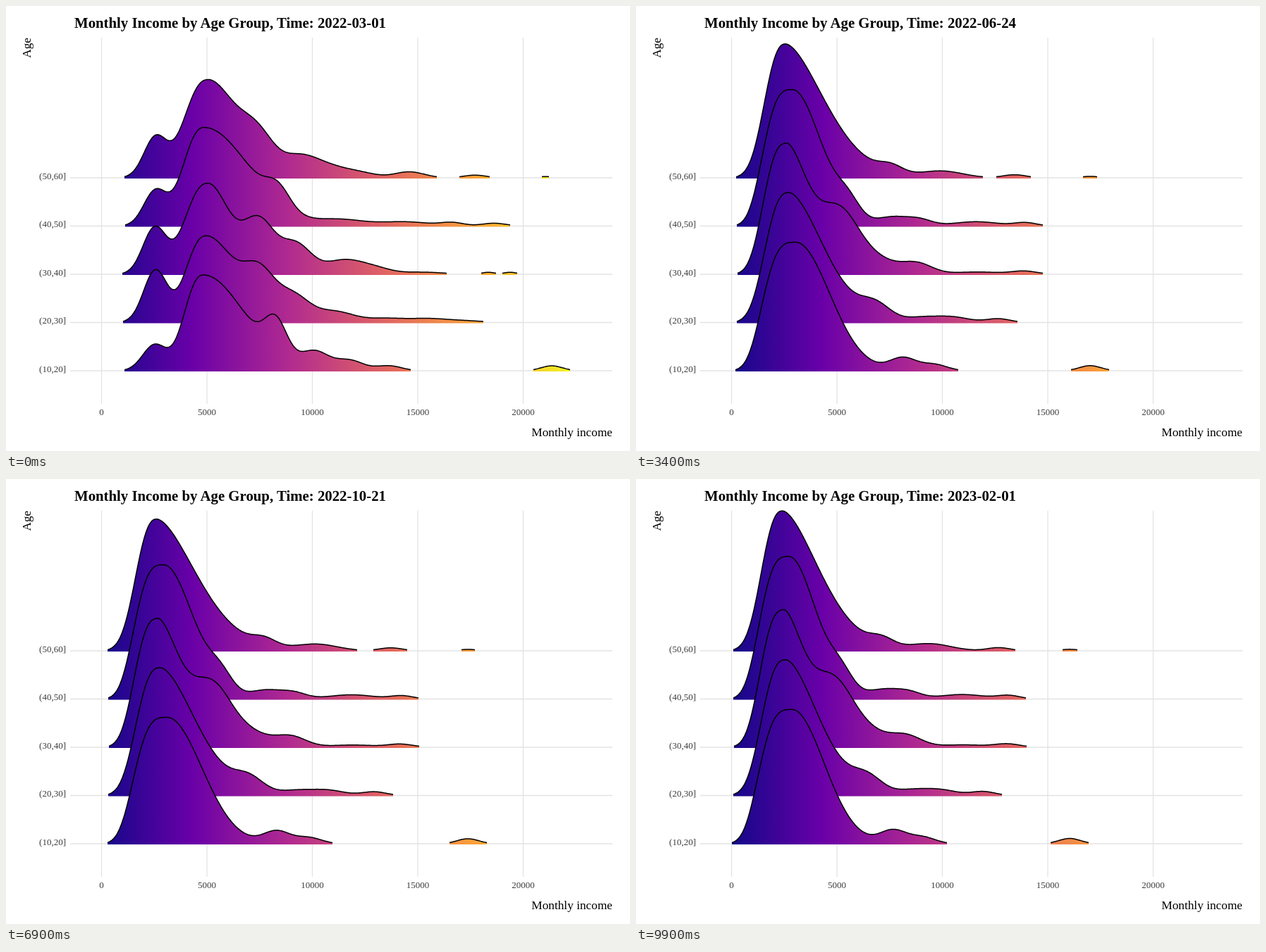
An HTML page that plays this animation: 885 px wide and 632 px high, repeating every 10000 ms.

```html
<!DOCTYPE html>
<html lang="en">
<head>
<meta charset="utf-8">
<title>Monthly Income by Age Group</title>
<style>
  html, body { margin: 0; width: 100%; height: 100%; overflow: hidden; background: #fff; }
  svg { display: block; width: 885px; height: 632px; font-family: "Liberation Serif", "Times New Roman", serif; }
  #title { font-size: 20.8px; font-weight: bold; }
  .axis { font-size: 17.3px; text-anchor: end; }
  .tick { font-size: 13px; fill: #3c3c3c; }
  .grid { stroke: #e3e3e3; stroke-width: 1.3; }
  .line { fill: none; stroke: #000; stroke-width: 1.5; stroke-linejoin: round; }
</style>
</head>
<body>
<svg id="stage" viewBox="0 0 885 632">
  <defs><linearGradient id="plasma" gradientUnits="userSpaceOnUse" x1="128" x2="812" y1="0" y2="0"></linearGradient></defs>
  <text id="title" x="97" y="30.5"></text>
  <text class="axis" x="860" y="611">Monthly income</text>
  <text class="axis" transform="translate(34.5 45) rotate(-90)">Age</text>
</svg>
<script>
const stage = document.getElementById('stage');
const title = document.getElementById('title');
const ZERO = 135.5, CUT = 1.5, FRAMES = 100;
const lerp = (a, b, t) => a + (b - a) * t;

function add(tag, attrs, text = '', parent = stage) {
  const el = document.createElementNS('http://www.w3.org/2000/svg', tag);
  for (const key in attrs) el.setAttribute(key, attrs[key]);
  el.textContent = text;
  return parent.appendChild(el);
}

['#0d0887', '#6a00a8', '#b12a90', '#e16462', '#fca636', '#f0f921']
  .forEach((color, i) => add('stop', { offset: i / 5, 'stop-color': color }, '', document.getElementById('plasma')));

for (let i = 0; i < 5; i++) {
  const x = ZERO + i * 149.5, y = 244 + i * 68.5;
  add('line', { class: 'grid', x1: x, x2: x, y1: 45, y2: 565 });
  add('line', { class: 'grid', x1: 91, x2: 860, y1: y, y2: y });
  add('text', { class: 'tick', x, y: 580.5, 'text-anchor': 'middle' }, i * 5000);
  add('text', { class: 'tick', x: 85, y: y + 1.5, 'text-anchor': 'end' }, `(${50 - i * 10},${60 - i * 10}]`);
}

// A lopsided bell: centre, height, then width and exponent of each side.
const hump = (x, h, left, p, right, q) => ({ x, h, left, p, right, q, main: true });
const bump = (x, h, sd) => ({ x, h, left: sd * Math.SQRT2, p: 2, right: sd * Math.SQRT2, q: 2 });

// Each age group is a sum of bells, once for the first month and once for the rest.
const bands = [];
function band(first, rest) {
  bands.push({
    base: 244 + bands.length * 68.5, first, rest,
    fill: add('path', { fill: 'url(#plasma)' }),
    line: add('path', { class: 'line' })
  });
}

band(
  [bump(212, 57, 16.5), hump(286, 139, 43.3, 2.4, 57, 2), bump(358, 48, 24), bump(415, 24, 24), bump(455, 16, 30),
   bump(505, 5, 22), bump(572, 8.5, 21), bump(665, 3.8, 16), bump(765, 1.8, 9)],
  [hump(215, 185, 37.4, 2.5, 82, 1.7), bump(370, 10.5, 17), bump(445, 9, 30), bump(552, 4.2, 16.3), bump(663, 2, 13)]);
band(
  [bump(212, 50, 16.5), hump(281, 140, 39, 2.4, 90, 2), bump(386, 27, 17), bump(475, 8.5, 33), bump(565, 6, 36),
   bump(633, 4.5, 16), bump(692, 4, 17)],
  [hump(225, 188.5, 48.5, 3.2, 60, 2), bump(307, 23, 17), bump(372, 12, 22), bump(412, 8.5, 18), bump(495, 6, 32), bump(568, 4.5, 16)]);
band(
  [bump(211, 66, 16.8), hump(286, 129, 42, 2.4, 44, 2), bump(359, 72, 22), bump(411, 42, 22), bump(480, 20, 27),
   bump(525, 7, 22), bump(590, 3, 30), bump(684, 2.8, 9), bump(715, 2.8, 9)],
  [hump(216, 180, 39.4, 2.75, 47.3, 1.8), bump(296, 78, 27), bump(350, 18, 27), bump(408, 15, 22), bump(497, 3.2, 32), bump(566, 4.3, 18)]);
band(
  [bump(212, 74, 16.8), hump(284, 123, 37.6, 2.4, 58, 2), bump(360, 58, 22), bump(407, 36, 23), bump(466, 15.5, 28),
   bump(540, 5.5, 26), bump(597, 5, 26), bump(648, 2.5, 28)],
  [hump(220, 179.5, 41.8, 2.7, 73, 1.75), bump(348, 19, 21), bump(415, 6, 22), bump(460, 7.5, 24), bump(528, 5.2, 17)]);
band(
  [bump(211, 37, 17), hump(280, 136, 35.3, 2.4, 82, 2), bump(383, 50, 16), bump(438, 25, 20), bump(487, 14.5, 20),
   bump(543, 7, 18), bump(774, 7, 15)],
  [hump(230, 177.5, 54, 3.4, 70, 2), bump(388, 17.5, 19), bump(434, 8.5, 18), bump(663, 7, 15.4)]);

// Later pay follows the number of working days in each month.
const workDays = [21, 21, 22, 22, 21, 23, 22, 21, 22, 22, 22, 20];
const monthStart = workDays.map((_, i) => (Date.UTC(2022, 2 + i, 1) - Date.UTC(2022, 2, 1)) / 864e5);
const DAYS = monthStart[11];

// Pay drops after the first month; the old bells slide down while the new ones replace them.
const drop = x => x - Math.min(100, 0.6 * (x - 175));
const lift = x => x + Math.min(100, 1.5 * (x - 175));

function blend({ first, rest }, work, morph) {
  const k = work / 22, grow = k ** -0.75;
  return [
    ...first.map(b => ({ ...b, x: lerp(b.x, drop(b.x), morph), h: b.h * (1 - morph) })),
    ...rest.map(b => {
      const x = ZERO + (b.x - ZERO) * k;
      return { ...b, x: lerp(lift(x), x, morph), h: b.h * grow * morph, right: b.main ? b.right * k : b.right };
    })
  ].filter(b => b.h > 0);
}

const height = (bells, x) => bells.reduce((sum, b) => {
  const d = x - b.x;
  return sum + b.h * Math.exp(d < 0 ? -((-d / b.left) ** b.p) : -((d / b.right) ** b.q));
}, 0);

// Runs of the curve that rise above the cut-off.
function runs(bells) {
  const found = [];
  let run = null;
  for (let x = 130; x < 830; x++) {
    const h = height(bells, x);
    if (h < CUT) run = null;
    else {
      if (!run) found.push(run = []);
      run.push([x, h]);
    }
  }
  return found;
}

function draw(frame) {
  const day = frame * DAYS / (FRAMES - 1);
  let i = 0;
  while (i < 10 && day >= monthStart[i + 1]) i++;
  const f = (day - monthStart[i]) / (monthStart[i + 1] - monthStart[i]);
  const work = lerp(workDays[i], workDays[i + 1], f);

  for (const b of bands) {
    let fill = '', line = '';
    for (const run of runs(blend(b, work, i ? 1 : f))) {
      const d = run.map(([x, h]) => `${x},${(b.base - h).toFixed(2)}`).join('L');
      const left = run[0][0], right = run[run.length - 1][0], y = b.base + 1;
      line += 'M' + d;
      fill += `M${d}L${right},${y}L${left},${y}Z`;
    }
    b.fill.setAttribute('d', fill);
    b.line.setAttribute('d', line);
  }
  const date = new Date(Date.UTC(2022, 2, 1 + Math.floor(day))).toISOString().slice(0, 10);
  title.textContent = 'Monthly Income by Age Group, Time: ' + date;
}

const began = performance.now();
let shown = -1;
function tick() {
  const frame = Math.floor((performance.now() - began) / 100) % FRAMES;
  if (frame !== shown) draw(shown = frame);
  requestAnimationFrame(tick);
}
tick();
</script>
</body>
</html>
```
